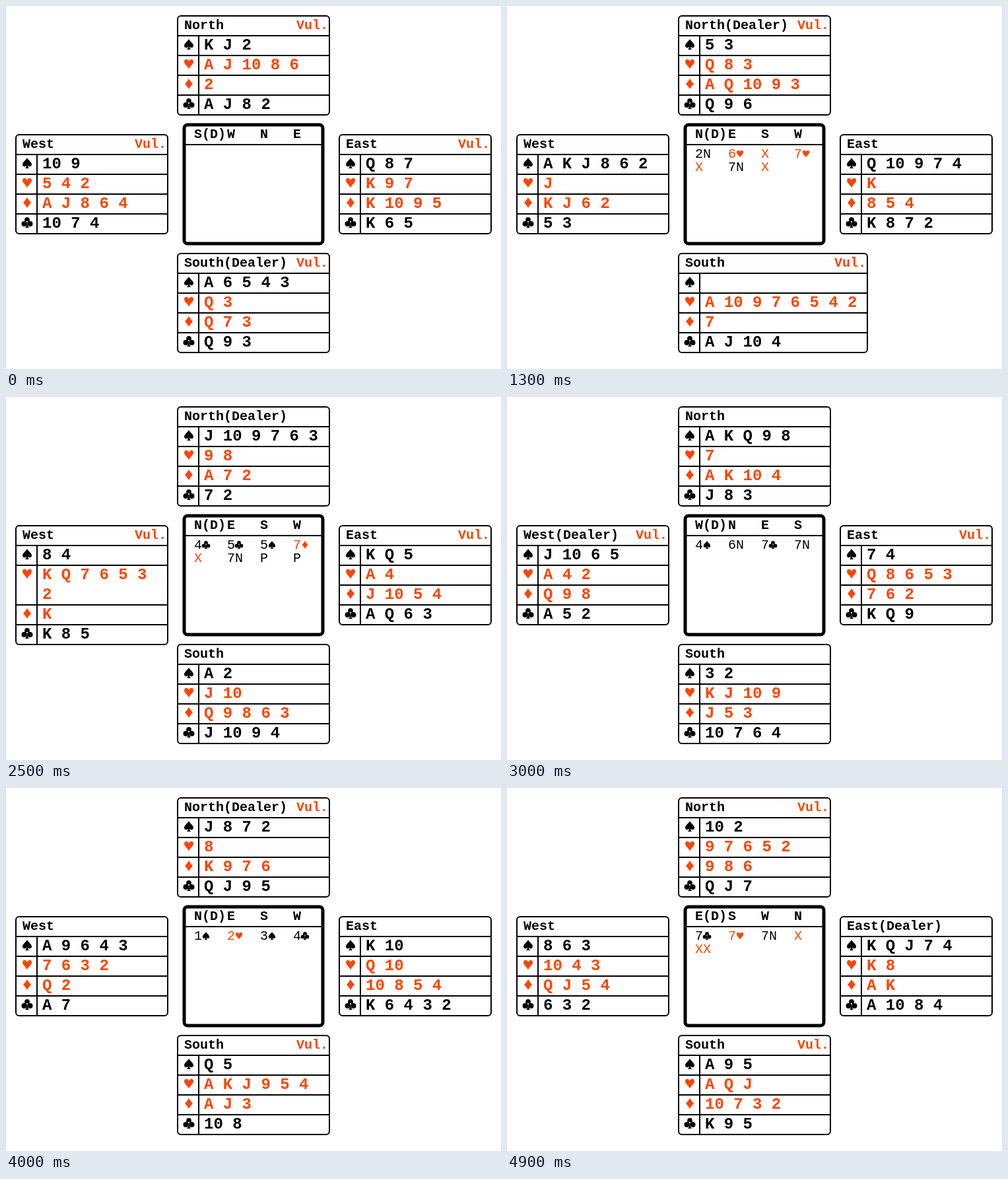
These frames come from a looping animation (750 px wide and 550 px high, 5 s). An HTML page:

```html
<!DOCTYPE html>
<html lang="en">
<head>
<meta charset="utf-8">
<title>Bridge deals</title>
<style>
  html, body { margin: 0; width: 100%; height: 100%; overflow: hidden; background: #fff; }
  svg { display: block; width: 750px; height: 550px; }
  text { font-family: "Courier New", Courier, "Liberation Mono", monospace; white-space: pre; }
  .head { font-size: 20px; font-weight: bold; }
  .cards { font-size: 24px; font-weight: bold; }
  .call { font-size: 20px; }
  .line { fill: none; stroke: #000; stroke-width: 2; }
  .thick { fill: none; stroke: #000; stroke-width: 5; }
  .red { fill: #ff4500; }
</style>
</head>
<body>
<svg id="stage" viewBox="0 0 750 550"></svg>
<script>
const STEP = 100;
const SEATS = 'NESW';
const NAMES = { N: 'North', E: 'East', S: 'South', W: 'West' };
const PLACES = { N: [260, 15], E: [505, 195], S: [260, 375], W: [15, 195] };

// Hands run N, E, S, W; suits run S.H.D.C; T stands for 10.
const DEALS = [
  { dealer: 'S', vul: 'NESW', calls: '4N 6C 7S P P',
    hands: 'KJ2.AJT86.2.AJ82 Q87.K97.KT95.K65 A6543.Q3.Q73.Q93 T9.542.AJ864.T74' },
  { dealer: 'N', vul: 'NS', calls: '2N 6H X 7H X 7N X XX P P',
    hands: '53.Q83.AQT93.Q96 QT974.K.854.K872 .AT976542.7.AJT4 AKJ862.J.KJ62.53' },
  { dealer: 'N', vul: 'EW', calls: '4C 5C 5S 7D X 7N P P',
    hands: 'JT9763.98.A72.72 KQ5.A4.JT54.AQ63 A2.JT.Q9863.JT94 84.KQ76532.K.K85' },
  { dealer: 'W', vul: 'EW', calls: '4S 6N 7C 7N P P X P P',
    hands: 'AKQ98.7.AKT4.J83 74.Q8653.762.KQ9 32.KJT9.J53.T764 JT65.A42.Q98.A52' },
  { dealer: 'N', vul: 'NS', calls: '1S 2H 3S 4C 6S P P',
    hands: 'J872.8.K976.QJ95 KT.QT.T854.K6432 Q5.AKJ954.AJ3.T8 A9643.7632.Q2.A7' },
  { dealer: 'E', vul: 'NS', calls: '7C 7H 7N X XX',
    hands: 'T2.97652.986.QJ7 KQJ74.K8.AK.AT84 A95.AQJ.T732.K95 863.T43.QJ54.632' }
].map(d => ({ ...d, calls: d.calls.split(' '), hands: d.hands.split(' ') }));

const STEM = 'C1 6 2 7 3.2 8H-3.2C-2 7-1 6-1 3.5';
const ball = (x, y, r) => `M${x - r} ${y}a${r} ${r} 0 1 0 ${2 * r} 0a${r} ${r} 0 1 0 ${-2 * r} 0Z`;
const SUITS = {
  S: `M0-8C1.5-4.5 7-1.5 7 2C7 6 2.5 6.2 1 3.5${STEM}C-2.5 6.2-7 6-7 2C-7-1.5-1.5-4.5 0-8Z`,
  H: 'M0 7.5C-1.5 3.5-7 0-7-3.5C-7-8.3-1.5-8.3 0-4C1.5-8.3 7-8.3 7-3.5C7 0 1.5 3.5 0 7.5Z',
  D: 'M0-8Q2.5-3.5 6 0Q2.5 3.5 0 8Q-2.5 3.5-6 0Q-2.5-3.5 0-8Z',
  C: ball(0, -4.1, 3.9) + ball(-4.6, 2, 3.9) + ball(4.6, 2, 3.9) + `M-1-2H1V3.5${STEM}Z`
};

const isRed = s => /[HDX]/.test(s);
const text = (x, y, s, cls, red) =>
  `<text x="${x}" y="${y}" class="${cls}${red ? ' red' : ''}">${s}</text>`;
const path = (d, cls) => `<path d="${d}" class="${cls}"/>`;
const box = (x, y, w, h, cls) =>
  `<rect x="${x}" y="${y}" width="${w}" height="${h}" rx="5" class="${cls}"/>`;
const pip = (x, y, suit, size) =>
  `<path d="${SUITS[suit]}" transform="translate(${x} ${y}) scale(${size})"${isRed(suit) ? ' class="red"' : ''}/>`;

// Side hands wrap after six cards; the others widen their panel.
function cardLines(cards, side) {
  const list = [...cards].map(c => c === 'T' ? '10' : c);
  return side && list.length > 6
    ? [list.slice(0, 6).join(' '), list.slice(6).join(' ')]
    : [list.join(' ')];
}

function panel(deal, seat) {
  const [x, y] = PLACES[seat];
  const side = seat === 'E' || seat === 'W';
  const suits = deal.hands[SEATS.indexOf(seat)].split('.').map(c => cardLines(c, side));
  const longest = Math.max(...suits.flat().map(s => s.length));
  const w = side ? 230 : Math.max(230, Math.round(longest * 14.4 + 56));
  const title = NAMES[seat] + (seat === deal.dealer ? '(Dealer)' : '');
  let out = text(x + 10, y + 20, title, 'head');
  if (deal.vul.includes(seat)) out += text(x + w - 50, y + 20, 'Vul.', 'head', true);
  let top = y + 30;
  suits.forEach((lines, i) => {
    const suit = 'SHDC'[i];
    out += path(`M${x} ${top}h${w}`, 'line') + pip(x + 17, top + 13, suit, 1);
    lines.forEach((s, n) => {
      out += text(x + 40, top + 21 + 30 * n, s, 'cards', isRed(suit));
    });
    top += 30 * lines.length;
  });
  return out + path(`M${x + 32} ${y + 30}V${top}`, 'line') + box(x, y, w, top - y, 'line');
}

function auction(deal, count) {
  const first = SEATS.indexOf(deal.dealer);
  let out = box(270, 180, 210, 180, 'thick') + path('M270 210h210', 'line');
  for (let i = 0; i < 4; i++) {
    out += text(285 + 50 * i, 200, SEATS[(first + i) % 4] + (i ? '' : '(D)'), 'head');
  }
  deal.calls.slice(0, count).forEach((call, i) => {
    const x = 285 + 50 * (i % 4), y = 230 + 20 * Math.floor(i / 4);
    const suit = SUITS[call[1]] ? call[1] : '';
    out += text(x, y, suit ? call[0] : call, 'call', isRed(call));
    if (suit) out += pip(x + 18, y - 6, suit, 0.74);
  });
  return out;
}

const stage = document.getElementById('stage');
const total = DEALS.reduce((n, d) => n + d.calls.length + 1, 0);
let shown = -1;

function draw(step) {
  let i = 0, count = step;
  while (count > DEALS[i].calls.length) count -= DEALS[i++].calls.length + 1;
  const deal = DEALS[i];
  stage.innerHTML = [...SEATS].map(s => panel(deal, s)).join('') + auction(deal, count);
}

const start = performance.now();
function tick(now) {
  const step = Math.floor(Math.max(0, now - start) / STEP) % total;
  if (step !== shown) draw(shown = step);
  requestAnimationFrame(tick);
}
tick(start);
</script>
</body>
</html>
```
